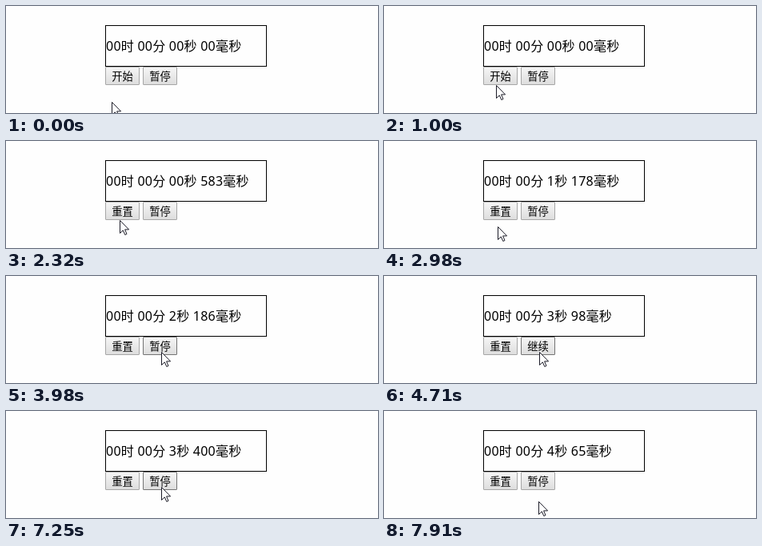
Animation, 465 px wide and 134 px high, one loop 8000 ms. Source, as an HTML page:

```html
<!DOCTYPE html>
<html lang="zh-CN">
<head>
<meta charset="utf-8">
<title>秒表</title>
<style>
html, body { margin: 0; width: 100%; height: 100%; overflow: hidden; background: #fefefe; }
svg { display: block; width: 465px; height: 134px; }
text { font-family: "Noto Sans", "Noto Sans CJK SC", "Noto Sans CJK", sans-serif; fill: #000; }
#clock { font-size: 16px; letter-spacing: .23px; }
.label { font-size: 13.33px; text-anchor: middle; }
</style>
</head>
<body>
<svg viewBox="0 0 465 134">
  <defs>
    <linearGradient id="raised" x2="0" y2="1"><stop stop-color="#f6f6f6"/><stop offset="1" stop-color="#dddddd"/></linearGradient>
    <linearGradient id="pressed" x2="0" y2="1"><stop stop-color="#d8d8d8"/><stop offset="1" stop-color="#e8e8e8"/></linearGradient>
  </defs>
  <rect x="124.5" y="24.5" width="201" height="51" fill="none" stroke="#000"/>
  <text id="clock" x="125" y="56"></text>
  <g id="buttons"></g>
  <path id="cursor" d="M.5 .5V16.5L4.3 12.9L6.8 18.5L9 17.5L6.6 11.9H11.6Z" fill="#fff" stroke="#1c1c28" stroke-linejoin="round"/>
</svg>
<script>
const LOOP = 8000;
const NS = "http://www.w3.org/2000/svg";
const $ = id => document.getElementById(id);

// The screen refreshes in bursts and holds still in between
const bursts = [
  { start: 0, step: 1, steps: 0 },
  { start: 430, step: 140, steps: 5 },
  { start: 1410, step: 129, steps: 8 },
  { start: 2600, step: 126, steps: 7 },
  { start: 3680, step: 147, steps: 7 },
  { start: 5220, step: 133, steps: 3 },
  { start: 6550, step: 139, steps: 7 },
  { start: 7670, step: 120, steps: 2 }
];

// Straight pointer moves
const moves = [
  { from: 300, to: 1130, x: 142, y: 95 },
  { from: 2220, to: 2500, x: 142, y: 107 },
  { from: 3050, to: 3530, x: 185, y: 112 },
  { from: 3530, to: 3820, x: 194, y: 95 },
  { from: 5080, to: 5620, x: 193, y: 118 },
  { from: 6400, to: 6616, x: 194, y: 95 },
  { from: 7250, to: 7790, x: 193, y: 113 }
];

const click = { start: 1668, pause: 4709, resume: 6967 };

// [time, stopwatch reading]; it runs evenly between these
const readings = [
  [click.start, 0], [1797, 122], [2978, 1178], [3974, 2186],
  [click.pause, 3098], [6943, 3098], [7910, 4065]
];

const progress = (t, from, to) => Math.min(1, Math.max(0, (t - from) / (to - from)));

function refreshTime(time) {
  const { start, step, steps } = bursts.filter(b => b.start <= time).pop();
  return start + step * Math.min(steps, Math.floor((time - start) / step));
}

function pointerAt(t) {
  let x = 132, y = 120;
  for (const move of moves) {
    const k = progress(t, move.from, move.to);
    x += (move.x - x) * k;
    y += (move.y - y) * k;
  }
  return [Math.floor(x), Math.round(y)];
}

function elapsedAt(t) {
  let ms = 0;
  for (let i = 1; i < readings.length; i++) {
    const [from] = readings[i - 1], [to, value] = readings[i];
    ms += (value - ms) * progress(t, from, to);
  }
  return Math.round(ms);
}

function clockText(ms) {
  const sec = Math.floor(ms / 1000);
  return `00时 00分 ${sec || "00"}秒 ${ms % 1000 || "00"}毫秒`;
}

function add(parent, tag, attrs) {
  const el = document.createElementNS(NS, tag);
  for (const name in attrs) el.setAttribute(name, attrs[name]);
  return parent.appendChild(el);
}

function makeButton(x) {
  const face = add($("buttons"), "rect", { x: x + .5, y: 76.5, width: 42, height: 22, rx: .5 });
  const label = add($("buttons"), "text", { x: x + 21.5, y: 93, class: "label" });
  return (text, px, py, down) => {
    const over = px >= x && px < x + 43 && py < 99;
    face.setAttribute("fill", over && down ? "url(#pressed)" : "url(#raised)");
    face.setAttribute("stroke", over ? "#747474" : "#a6a6a6");
    label.textContent = text;
  };
}

const startButton = makeButton(124);
const pauseButton = makeButton(171);

function draw(time) {
  const t = refreshTime(time);
  const [x, y] = pointerAt(t);
  const down = Object.values(click).some(at => t < at && at - t < 150);
  const paused = t >= click.pause && t < click.resume;

  $("clock").textContent = clockText(elapsedAt(t));
  startButton(t < click.start ? "开始" : "重置", x, y, down);
  pauseButton(paused ? "继续" : "暂停", x, y, down);
  $("cursor").setAttribute("transform", `translate(${x} ${y})`);
}

const began = performance.now();
function loop() {
  draw((performance.now() - began) % LOOP);
  requestAnimationFrame(loop);
}
loop();
</script>
</body>
</html>
```
